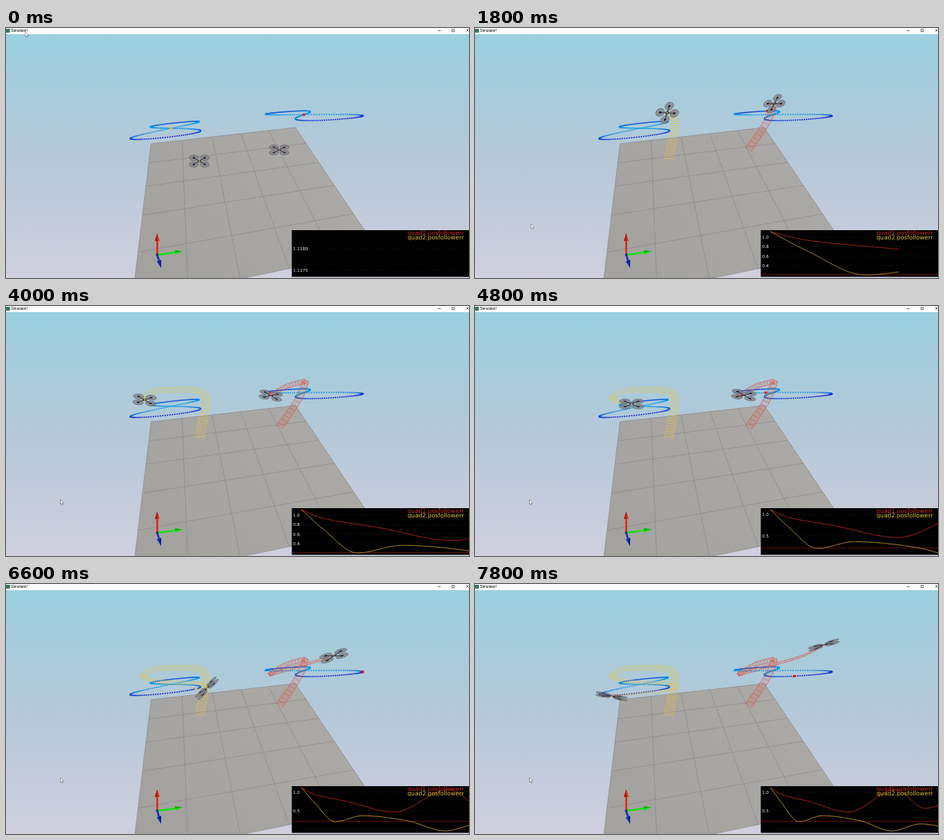
An HTML page with a canvas for the animation above (8 s loop, 600 by 324 pixels).

```html
<!DOCTYPE html>
<html>
<head>
<meta charset="utf-8">
<style>
  html, body { margin: 0; width: 100%; height: 100%; overflow: hidden; }
  canvas { display: block; }
</style>
</head>
<body>
<canvas id="stage" width="600" height="324"></canvas>
<script>
const ctx = document.getElementById('stage').getContext('2d');
const LOOP = 8000, STEP = 200, PERIOD = 9.9, TAU = Math.PI * 2;

// Smooth curve through rows of [time, ...values], level at each turning point.
function spline(keys, t) {
  const last = keys.length - 1;
  let i = 0;
  while (i < last - 1 && keys[i + 1][0] <= t) i++;
  const a = keys[i], b = keys[i + 1], span = b[0] - a[0];
  const s = Math.min(1, Math.max(0, (t - a[0]) / span)), s2 = s * s, s3 = s2 * s;
  const slope = (j, k) => {
    const before = keys[Math.max(j - 1, 0)], here = keys[j], after = keys[Math.min(j + 1, last)];
    const turns = (here[k] - before[k]) * (after[k] - here[k]) < 0;
    return turns ? 0 : (after[k] - before[k]) / (after[0] - before[0]) * span;
  };
  return a.slice(1).map((value, n) =>
    (2 * s3 - 3 * s2 + 1) * value + (s3 - 2 * s2 + s) * slope(i, n + 1) +
    (3 * s2 - 2 * s3) * b[n + 1] + (s3 - s2) * slope(i + 1, n + 1));
}

// Figure eight seen in perspective: "far" points away from the viewer, "side" along the lobes.
const figureEight = (center, far, side) => u => {
  const a = Math.sin(TAU * u), b = Math.sin(2 * TAU * u), depth = 1 + .26 * a;
  return center.map((c, i) => c + (far[i] * a + side[i] * b) / depth);
};

// flight rows: time, x, y, tilt, apparent depth; error rows: time, value
const drones = [
  {
    name: 'quad1.posfollowerr', trail: '#e0503c', plot: '#b82619', legend: '#c8281a', target: '#e82020',
    ribbon: [5, 4], rung: .15, fill: .13, dash: [],
    course: figureEight([386, 112.3], [-36.5, -4.2], [32, -2.7]),
    flight: [[0, 354, 158, 0, 5], [1.2, 380, 119, -.4, 6], [1.8, 388, 98, -.55, 6.4], [3, 364, 104, -.17, 5],
      [4.3, 341, 117.5, .2, 4.5], [5.8, 385, 105, -.1, 5.8], [6.6, 425, 93, -.3, 4.5], [7.8, 452, 79, -.29, 2.3]],
    error: [[0, 1.118], [.5, .94], [1.8, .745], [3.65, .46], [5.8, 1.07], [7.2, .56], [7.9, .65]]
  },
  {
    name: 'quad2.posfollowerr', trail: '#ecc43c', plot: '#c0961e', legend: '#e4c034', target: '#e8b840',
    ribbon: [6, 4.5], rung: .08, fill: .06, dash: [1.5, 1],
    course: figureEight([214, 130], [8, -9], [37, -3.8]),
    flight: [[0, 250.5, 172.5, 0, 6], [1.3, 259, 120, -.5, 8], [1.8, 249, 110, -.6, 8], [3, 201, 109, .1, 5.7],
      [3.7, 177, 119, .1, 5.5], [4.8, 203, 127, 0, 5], [5.8, 250, 129, -.73, 3], [6.6, 260.5, 135, -.78, 3],
      [7.8, 177, 145.5, .18, 2.3]],
    error: [[0, 1.118], [.5, .72], [1.33, .2], [2.4, .36], [4.2, .22], [5.65, -.05], [7, .14], [7.9, .08]]
  }
];
const cursorPath = [[0, 25, 5], [1.2, 25, 5], [1.7, 72.5, 254], [3, 70.5, 251]];

function trace(points) {
  ctx.beginPath();
  points.forEach(p => ctx.lineTo(...p));
}
function line(points, color, width = 1, dash = []) {
  trace(points);
  ctx.setLineDash(dash);
  ctx.strokeStyle = color;
  ctx.lineWidth = width;
  ctx.stroke();
  ctx.setLineDash([]);
}
function shape(points, color) {
  trace(points);
  ctx.fillStyle = color;
  ctx.fill();
}
function rect(x, y, w, h, color) {
  ctx.fillStyle = color;
  ctx.fillRect(x, y, w, h);
}
function square(x, y, size, color) {
  rect(x - size / 2, y - size / 2, size, size, color);
}
function text(str, x, y, size, color, font = 'DejaVu Sans') {
  ctx.font = `${size}px "${font}", sans-serif`;
  ctx.fillStyle = color;
  ctx.fillText(str, x, y);
}
function gradient(x0, y0, x1, y1, ...colors) {
  const g = ctx.createLinearGradient(x0, y0, x1, y1);
  colors.forEach((c, i) => g.addColorStop(i / (colors.length - 1), c));
  return g;
}

// Perspective map of the unit square onto the floor.
function floorPoint(u, v) {
  const g = .098, h = -.446, w = 1 + g * u + h * v;
  return [(188 + (187 + g * 375) * u + (-24.5 + h * 163.5) * v) / w,
          (150 + (-21 + g * 129) * u + (204 + h * 354) * v) / w];
}

function drawWorld() {
  rect(0, 0, 600, 324, gradient(0, 8, 0, 324, '#9bd0df', '#b5c8d8', '#d0cfde'));
  shape([floorPoint(0, 0), floorPoint(1, 0), floorPoint(1, 1), floorPoint(0, 1)],
    gradient(190, 310, 400, 150, '#a3a29f', '#aba9a6'));
  for (let k = 0; k <= 1.01; k += .2) {
    line([floorPoint(k, 0), floorPoint(k, 1)], '#908f8d', .8);
    line([floorPoint(0, k), floorPoint(1, k)], '#908f8d', .8);
  }
}

function arrow(x, y, color, dark) {
  const ox = 196, oy = 294, len = Math.hypot(x - ox, y - oy);
  const dx = (x - ox) / len, dy = (y - oy) / len;
  const bx = x - dx * 10, by = y - dy * 10;
  line([[ox, oy], [bx, by]], color, 2.4);
  shape([[x, y], [bx - dy * 3, by + dx * 3], [bx + dy * 3, by - dx * 3]], color);
  shape([[x, y], [bx, by], [bx + dy * 3, by - dx * 3]], dark);
}

function drawCourse(drone) {
  const dots = 200;
  for (let i = 0; i < dots; i++) {
    const u = i / dots;
    const glow = Math.min(1, Math.abs(Math.cos(TAU * u)) ** 1.5 + (u < .5 ? .4 : 0));
    square(...drone.course(u), 1.5, `rgb(0,${150 * glow},${205 + 25 * glow})`);
  }
}

// Ribbon lying across the direction of flight, narrowing with time.
function drawTrail(drone, t) {
  const left = [], right = [], color = drone.trail;
  for (let time = 0; time < t; time += drone.rung) {
    const [x, y] = spline(drone.flight, time);
    const [x0, y0] = spline(drone.flight, time - .05), [x1, y1] = spline(drone.flight, time + .05);
    const scale = (1 - time / 9) / (Math.hypot(x1 - x0, y1 - y0) || 1);
    const wx = (y0 - y1) * scale * drone.ribbon[0], wy = (x1 - x0) * scale * drone.ribbon[1];
    left.push([x - wx, y - wy]);
    right.push([x + wx, y + wy]);
  }
  for (let i = 1; i < left.length; i++) {
    ctx.globalAlpha = drone.fill;
    shape([left[i - 1], right[i - 1], right[i], left[i]], color);
    ctx.globalAlpha = .75;
    line([left[i], right[i]], color, .7);
  }
  const tip = spline(drone.flight, t).slice(0, 2);
  for (const rail of [left, right]) line([...rail, tip], color, .8, drone.dash);
  ctx.globalAlpha = 1;
}

function drawDrone(drone, t) {
  const [x, y, tilt, depth] = spline(drone.flight, t);
  const span = 10 + t * t * .1;
  const disc = (a, b, r, color) => {
    ctx.save();
    ctx.translate(x, y);
    ctx.rotate(tilt);
    ctx.scale(span, depth);
    ctx.beginPath();
    ctx.arc(a, b, r, 0, TAU);
    ctx.restore();
    ctx.fillStyle = color;
    ctx.fill();
  };
  for (let i = 0; i < 4; i++) {
    const a = Math.cos(TAU * (i + .5) / 4), b = Math.sin(TAU * (i + .5) / 4);
    disc(a, b, .58, 'rgba(130,131,137,.8)');
    ctx.strokeStyle = 'rgba(80,80,86,.7)';
    ctx.lineWidth = .7;
    ctx.stroke();
    const ax = a * span, by = b * depth, c = Math.cos(tilt), s = Math.sin(tilt);
    line([[x, y], [x + ax * c - by * s, y + ax * s + by * c]], '#3c3c44', 1);
    disc(a, b, .16, '#1c1c20');
  }
  disc(0, 0, .26, '#3a3a48');
  square(x, y, 1.6, drone.trail);
}

// Smallest 1-2-5 step that keeps the tick marks apart.
function tickStep(scale) {
  for (let e = -5; e < 1; e++) {
    const step = [1, 2, 5].map(m => m * 10 ** e).find(s => s * scale >= 12);
    if (step) return step;
  }
  return 1;
}

function drawPlot(t) {
  const top = 1.1184, samples = 200;
  const series = drones.map(d => Array.from({ length: samples + 1 }, (_, i) => {
    const time = t * i / samples;
    return [time, ...spline(d.error, time)];
  }));
  const low = Math.min(...series.flat().map(p => p[1]));
  const scale = 56 / Math.max(.001, top - low);
  const toX = time => 383 + 217 * time / Math.max(t, 2.35);
  const toY = v => 264 + (top - v) * scale;

  ctx.save();
  ctx.beginPath();
  ctx.rect(370.4, 262, 230, 60.5);
  ctx.clip();
  rect(370, 262, 230, 61, '#000');
  const step = tickStep(scale), digits = Math.max(0, -Math.floor(Math.log10(step) + 1e-9));
  for (let n = Math.floor(top / step); toY(n * step) < 321; n--) {
    const y = toY(n * step);
    line([[384, y], [600, y]], '#303030', .6, [1, 2]);
    if (y < 316) text((n * step).toFixed(digits), 372, y + 2, 5.5, '#e4e4e4');
  }
  if (t > 0) {
    line([[371, toY(.21)], [600, toY(.21)]], '#74120e', .8);
    series.forEach((points, i) =>
      line(points.map(([time, v]) => [toX(time), toY(v)]), drones[i].plot, .9));
  }
  drones.forEach((d, i) => text(d.name, 520.3, 268.4 + i * 6, 7.6, d.legend));
  ctx.restore();
}

function drawWindow() {
  rect(0, 0, 600, 8, '#fff');
  rect(0, 1, 5, 5, '#2f7d5a');
  text('Simulator!', 6.5, 5.4, 4.8, '#000', 'Liberation Sans');
  line([[559.5, 3.5], [563.5, 3.5]], '#333', .7);
  ctx.strokeRect(578, 1.8, 3, 3);
  line([[596.5, 1.5], [599.5, 4.5]], '#333', .7);
  line([[599.5, 1.5], [596.5, 4.5]], '#333', .7);
}

function drawCursor(t) {
  const [x, y] = spline(cursorPath, t);
  const outline = [[0, 0], [0, 6], [1.4, 4.8], [2.4, 7], [3.3, 6.6], [2.4, 4.5], [4.2, 4.4], [0, 0]]
    .map(p => [x + p[0], y + p[1]]);
  shape(outline, '#fff');
  line(outline, '#555', .5);
}

function draw(t) {
  drawWorld();
  arrow(201, 311, '#1030c0', '#0a1c80');
  arrow(229, 289.5, '#18e018', '#10a810');
  arrow(196, 266, '#e02810', '#a81808');
  square(196, 294, 3, '#1c2c90');
  drones.forEach(drawCourse);
  drones.forEach(d => drawTrail(d, t));
  drones.forEach(d => square(...d.course(t / PERIOD), 3.2, d.target));
  drones.forEach(d => drawDrone(d, t));
  drawPlot(t);
  drawWindow();
  drawCursor(t);
}

const start = performance.now();
function tick() {
  const elapsed = (performance.now() - start) % LOOP;
  draw(Math.floor(elapsed / STEP) * STEP / 1000);
  requestAnimationFrame(tick);
}
tick();
</script>
</body>
</html>
```
